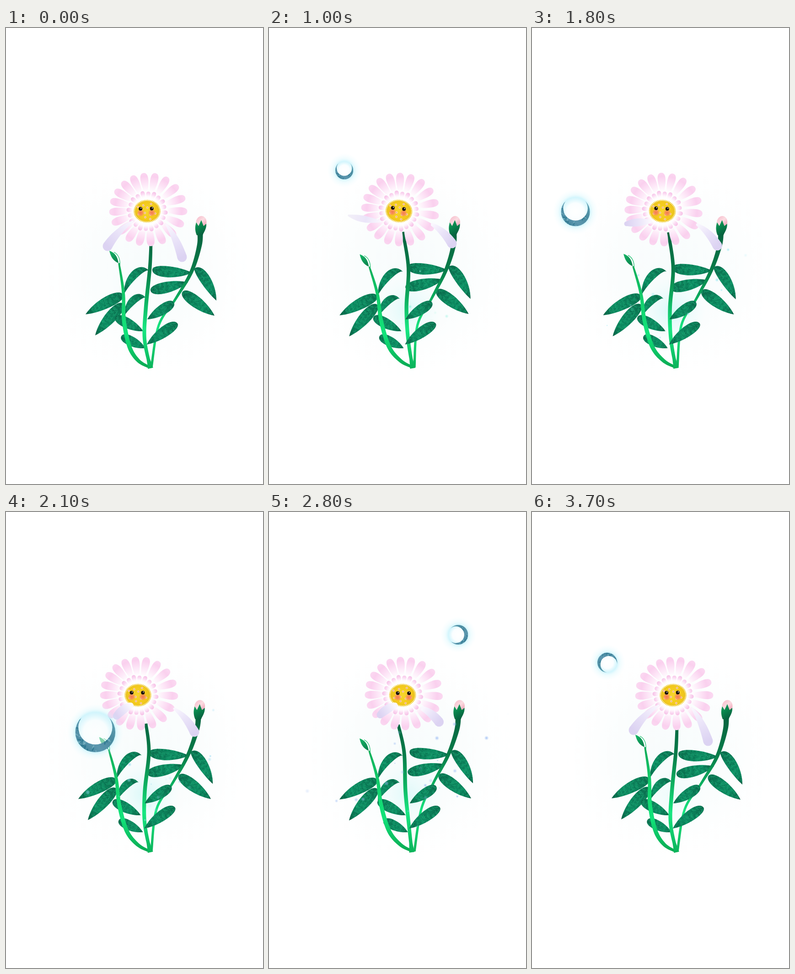
An HTML page with a canvas for the animation above (5400 ms loop, 562 by 997 pixels).

```html
<!DOCTYPE html>
<html lang="en">
<head>
<meta charset="utf-8">
<title>Flower and moon</title>
<style>
html, body { margin: 0; width: 100%; height: 100%; overflow: hidden; background: #fff; }
canvas { display: block; width: 562px; height: 997px; }
</style>
</head>
<body>
<canvas id="stage" width="562" height="997"></canvas>
<script>
const ctx = document.getElementById('stage').getContext('2d');
const W = 562, H = 997, LOOP = 5400, STEP = 100, LAST = 37;
const TAU = Math.PI * 2, RAD = Math.PI / 180;
const lerp = (a, b, t) => a + (b - a) * t;
const clamp = (x, lo = 0, hi = 1) => Math.max(lo, Math.min(hi, x));
const ease = t => t * t * (3 - 2 * t);
const ramp = (f, from, to) => ease(clamp((f - from) / (to - from)));
const seeded = s => () => (s = (s * 16807) % 2147483647) / 2147483647;

// Key poses: head and neck x, sideways lean of the leaf groups, face, hands relative to the head
const rest = { at: 0, head: 311, neck: 317, left: 0, right: 0, low: 0, tilt: -1, gaze: -2, lx: -89, ly: 80, rx: 74, ry: 104 };
const poses = [
  rest,
  { at: 5, head: 289.5, neck: 295, left: -18.5, right: -17, low: -10, tilt: 7, gaze: -1.5, lx: -112, ly: 13, rx: 112, ry: 74 },
  { at: 15, head: 284.5, neck: 290, left: -21, right: -20, low: -11, tilt: 5, gaze: -2, lx: -113, ly: 13, rx: 114, ry: 74 },
  { at: 21, head: 291, neck: 306, left: -16, right: -7.5, low: -5.5, tilt: 0, gaze: -1.5, lx: -49, ly: 49, rx: 121, ry: 84 },
  { at: 25, head: 288, neck: 269, left: -25, right: -18.5, low: -1, tilt: -1, gaze: 5.5, lx: -51, ly: 51, rx: 106, ry: 85 },
  { at: 31, head: 301.5, neck: 296, left: -15, right: -8, low: -1.5, tilt: 2, gaze: -2.5, lx: -52, ly: 42, rx: 48, ry: 39 },
  { ...rest, at: LAST }
];

function poseAt(f) {
  const i = Math.max(1, poses.findIndex(p => p.at >= f));
  const a = poses[i - 1], b = poses[i], t = ramp(f, a.at, b.at), out = {};
  for (const k in a) out[k] = lerp(a[k], b[k], t);
  return out;
}

function gradient(g, stops) {
  stops.forEach(([p, c]) => g.addColorStop(p, c));
  return g;
}
const linear = (x0, y0, x1, y1, ...stops) => gradient(ctx.createLinearGradient(x0, y0, x1, y1), stops);
const radial = (x, y, r, ...stops) => gradient(ctx.createRadialGradient(x, y, 0, x, y, r), stops);

function oval(x, y, rx, ry, fill, turn = 0) {
  ctx.beginPath();
  ctx.ellipse(x, y, rx, ry, turn, 0, TAU);
  ctx.fillStyle = fill;
  ctx.fill();
}
const disc = (x, y, r, fill) => oval(x, y, r, r, fill);
const glow = (x, y, r, ...stops) => disc(x, y, r, radial(x, y, r, ...stops));

function moved(dx, dy, paint) {
  ctx.save();
  ctx.translate(dx, dy);
  paint();
  ctx.restore();
}

// Smooth samples through a few points
function spline(pts, n = 10) {
  const out = [];
  for (let i = 0; i < pts.length - 1; i++) {
    const a = pts[i], b = pts[i + 1], p = pts[i - 1] || a, q = pts[i + 2] || b;
    for (let s = 0; s < n; s++) {
      const t = s / n;
      out.push([0, 1].map(k => a[k] + t * ((b[k] - p[k]) / 2 +
        t * (p[k] - 2.5 * a[k] + 2 * b[k] - q[k] / 2 +
        t * (1.5 * (a[k] - b[k]) + (q[k] - p[k]) / 2)))));
    }
  }
  return out.concat([pts[pts.length - 1]]);
}

// Band of varying half width along samples
function ribbon(pts, half, fill) {
  const end = pts.length - 1, left = [], right = [];
  pts.forEach(([x, y], i) => {
    const a = pts[Math.max(0, i - 1)], b = pts[Math.min(end, i + 1)];
    const ang = Math.atan2(b[1] - a[1], b[0] - a[0]), w = half(i / end);
    const dx = -Math.sin(ang) * w, dy = Math.cos(ang) * w;
    left.push([x + dx, y + dy]);
    right.unshift([x - dx, y - dy]);
  });
  ctx.beginPath();
  left.concat(right).forEach(p => ctx.lineTo(p[0], p[1]));
  ctx.closePath();
  ctx.fillStyle = fill;
  ctx.fill();
}

// Leaf from its blunt end to its point, optionally bent sideways
function leaf(bx, by, tx, ty, bend = 0) {
  const len = Math.hypot(tx - bx, ty - by), wide = 9 + len * .09 - Math.abs(bend) * .2;
  const h1 = bend + wide, h2 = bend - wide, rnd = seeded(Math.round(bx * 31 + ty * 7));
  moved(bx, by, () => {
    ctx.rotate(Math.atan2(ty - by, tx - bx));
    ctx.beginPath();
    ctx.moveTo(0, 0);
    ctx.bezierCurveTo(0, h1, len * .62, h1, len, 0);
    ctx.bezierCurveTo(len * .62, h2, 0, h2, 0, 0);
    ctx.fillStyle = linear(0, 0, len, 0, [0, '#0a6a4b'], [.3, '#0c7f59'], [.65, '#0d8c62'], [1, '#086044']);
    ctx.fill();
    ctx.clip();
    for (let x = 3; x < len; x += 9) {
      for (let y = Math.min(h2, 0); y < Math.max(h1, 0); y += 8) {
        const cx = x + rnd() * 5, cy = y + rnd() * 5, turn = rnd() * 3;
        for (let k = 0; k < 3; k++) {
          const a = turn + k * 1.1;
          oval(cx + Math.cos(a) * 3, cy + Math.sin(a) * 3, 2.7, 1.2, 'rgba(30,172,120,.4)', a);
        }
        oval(cx + 4, cy + 3, 2.5, .8, 'rgba(3,66,51,.3)', turn);
      }
    }
  });
}

function plant(p) {
  const { left, right, low, neck } = p, lean = neck - 317;
  const budX = -.06 * right * right, sproutX = left * 1.4, sproutY = left * left * .02;
  const drop = left * left * .006;
  moved(left, drop, () => {
    leaf(257, 584, 174, 626, 3);
    leaf(257, 603, 195, 672, 2);
    leaf(313, 531, 258, 582, 21);
    leaf(306, 590, 258, 630, 18);
  });
  moved(low, 0, () => {
    leaf(239, 632, 300, 663);
    leaf(252, 674, 305, 700);
  });
  moved(right * .95, right * .33, () => {
    leaf(320, 528, 407, 535, 3);
    leaf(316, 574, 398, 556, 1);
  });
  moved(right * 1.05, right * .2, () => {
    leaf(413, 525, 460, 596, -7);
    leaf(386, 577, 456, 629);
  });

  const light = linear(0, 500, 0, 742, [0, '#0aa253'], [.4, '#14d16d'], [.7, '#12e37a'], [1, '#09a952']);
  const deep = linear(0, 440, 0, 742, [0, '#08623f'], [.3, '#087c49'], [.5, '#0cad5e'], [.72, '#18e781'], [1, '#0bb45b']);
  ribbon(spline([[424 + budX, 440], [423 + (budX + right) / 2, 475], [405 + right, 534 + right * .2],
    [371 + right * .85, 592], [334 + low * .9, 650], [318, 742]]),
    t => lerp(6.5, 2.6, Math.min(1, t * 1.6)), deep);
  ribbon(spline([[247 + sproutX, 514 + sproutY], [256.5 + left, 578 + drop], [258 + left * .65, 640],
    [270 + left * .38, 697], [289 + left * .1, 727], [312, 741]]),
    t => 1 + 3.6 * Math.sin(Math.PI * Math.min(.88, t * .8 + .06)), light);
  const sag = lean * lean;
  ribbon(spline([[neck, 440 + 32 * Math.abs(Math.cos(lean / 14))], [314.5 - sag * .016, 525],
    [306 + lean * .22, 610], [303 + sag * .002, 680], [316 - sag * .003, 744]]),
    t => 3.3 + .9 * Math.sin(t * 3) + Math.max(0, t - .9) * 25, deep);
  moved(low, 0, () => {
    leaf(367, 600, 309, 637);
    leaf(375, 646, 308, 692, 2);
  });
  moved(sproutX, sproutY, sprout);
  moved(budX, 1, bud);
}

function sprout() {
  ctx.beginPath();
  ctx.moveTo(226, 487);
  ctx.bezierCurveTo(238, 491, 244, 500, 246, 514);
  ctx.bezierCurveTo(234, 509, 229, 500, 226, 487);
  ctx.fillStyle = linear(226, 487, 246, 514, [0, '#16b767'], [1, '#087d4a']);
  ctx.fill();
  ctx.beginPath();
  ctx.moveTo(236, 490);
  ctx.bezierCurveTo(246, 495, 250, 506, 249, 518);
  ctx.strokeStyle = '#12bc67';
  ctx.lineWidth = 1.2;
  ctx.stroke();
}

function bud() {
  oval(427, 424, 11.5, 14, linear(417, 412, 439, 434, [0, '#f7bdcc'], [.45, '#fbdde2'], [1, '#f095ae']), .15);
  ctx.beginPath();
  ctx.moveTo(417, 452);
  ctx.bezierCurveTo(413, 442, 413, 433, 416, 424);
  ctx.lineTo(421, 432);
  ctx.lineTo(427, 419);
  ctx.lineTo(432, 432);
  ctx.lineTo(438, 427);
  ctx.bezierCurveTo(439, 437, 433, 445, 430, 452);
  ctx.closePath();
  ctx.fillStyle = linear(415, 421, 433, 448, [0, '#13a35f'], [.5, '#08824b'], [1, '#07613f']);
  ctx.fill();
}

function petal(deg, r0, r1, w, fill) {
  const len = r1 - r0;
  ctx.save();
  ctx.rotate(deg * RAD);
  ctx.beginPath();
  ctx.moveTo(0, -r0);
  ctx.bezierCurveTo(-w * .7, -r0 - len * .4, -w * 1.5, -r1, 0, -r1);
  ctx.bezierCurveTo(w * 1.5, -r1, w * .7, -r0 - len * .4, 0, -r0);
  ctx.fillStyle = fill;
  ctx.fill();
  ctx.restore();
}

function flower(p) {
  ctx.save();
  ctx.translate(p.head, 397);
  ctx.rotate(p.tilt * RAD);
  const outer = radial(0, 0, 86, [0, '#fff'], [.45, '#fff'], [.66, '#fde6f7'], [.85, '#fad0ee'], [1, '#fbdaf2']);
  const count = 19;
  for (let i = 0; i < count; i++) {
    const base = i * 360 / count - 3, a = base + 3 + 6.5 * Math.cos((base - 190) * RAD);
    petal(a, 26, 80 + 5.5 * Math.abs(Math.sin(a * RAD)), 10.2, outer);
  }
  ctx.translate(-2.5, 3.5);
  glow(0, 0, 48, [0, '#fff'], [.7, 'rgba(255,255,255,.85)'], [1, 'rgba(255,255,255,0)']);
  const inner = radial(0, 0, 45, [0, '#fff'], [.64, '#fff'], [.82, '#fce1f5'], [1, '#f6bfe6']);
  for (let i = 0; i < 20; i++) petal(i * 18 + 5, 20, 43 + i % 2 * 2, 5.6, inner);
  glow(0, 0, 38, [0, '#fff'], [.75, 'rgba(255,255,255,.9)'], [1, 'rgba(255,255,255,0)']);
  face(p.gaze);
  ctx.restore();
}

function face(gaze) {
  ctx.strokeStyle = '#efc825';
  ctx.lineWidth = 1.7;
  ctx.beginPath();
  for (let i = 0; i < 54; i++) {
    const c = Math.cos(i * TAU / 54), s = Math.sin(i * TAU / 54);
    ctx.moveTo(c * 24, s * 21);
    ctx.lineTo(c * 29.5, s * 25);
  }
  ctx.stroke();
  oval(0, 0, 26.5, 22.5, radial(0, 0, 27, [0, '#f7d52c'], [.7, '#f3c91d'], [1, '#eac11d']));
  // little blossoms on a spiral
  for (let i = 1; i < 13; i++) {
    const d = Math.sqrt(i / 13), x = 24 * d * Math.cos(i * 2.4), y = 20 * d * Math.sin(i * 2.4);
    for (let k = 0; k < 5; k++) {
      disc(x + Math.cos(k * TAU / 5) * 1.5, y + Math.sin(k * TAU / 5) * 1.5, 1, '#fde9cf');
    }
    disc(x, y, 1, '#e4607c');
  }
  const ey = -5.5 + Math.max(0, gaze) * .7;
  for (const side of [-1, 1]) {
    const x = gaze + side * 12.3;
    glow(x, ey + 9, 8.5, [0, 'rgba(247,112,91,.9)'], [.55, 'rgba(248,132,96,.75)'], [1, 'rgba(248,150,90,0)']);
    disc(x, ey, 4, '#160d09');
    disc(x + 1.2, ey - 1.4, 1.1, '#fff');
  }
}

// Long arms hang from a thin shoulder, short ones are plump, raised ones end in a point
function arm(head, sx, sy, hx, hy) {
  const len = Math.hypot(hx - sx, hy - sy);
  const tip = Math.min(10.5, hy / 6), root = clamp(12 - len / 7, 2, 8), bulge = 1 + (10.5 - tip) * .5;
  const cx = lerp(sx, hx, .6), cy = lerp(sy, hy, .35), pts = [];
  for (let i = 0; i <= 24; i++) {
    const t = i / 24;
    pts.push([lerp(lerp(sx, cx, t), lerp(cx, hx, t), t), lerp(lerp(sy, cy, t), lerp(cy, hy, t), t)]);
  }
  moved(head, 397, () => {
    const fill = linear(sx, sy, hx, hy, [0, '#faf7fe'], [.45, '#ebe5f9'], [1, tip < 4 ? '#f2eff8' : '#dcd3f2']);
    disc(sx, sy, root, fill);
    disc(hx, hy, tip, fill);
    ribbon(pts, t => lerp(root, tip, t) + bulge * Math.sin(Math.PI * t), fill);
  });
}

function drop(f) {
  ctx.globalAlpha = clamp(f / 3) * clamp((10 - f) / 2);
  moved(166, lerp(298, 310, ramp(f, 1, 5)), () => {
    glow(0, 4, 26, [0, 'rgba(125,218,255,.7)'], [.4, 'rgba(150,228,255,.35)'], [1, 'rgba(190,240,255,0)']);
    ctx.beginPath();
    ctx.moveTo(0, -19);
    ctx.bezierCurveTo(2, -9, 11, -2, 11, 7);
    ctx.bezierCurveTo(11, 21, -11, 21, -11, 7);
    ctx.bezierCurveTo(-11, -2, -2, -9, 0, -19);
    ctx.fillStyle = linear(0, -19, 0, 18, [0, '#54a9c9'], [.25, '#159bed'], [.65, '#1196f2'], [1, '#2b7fb7']);
    ctx.fill();
    oval(-6, 6, 2, 3.6, '#eefaff', .1);
  });
  ctx.globalAlpha = 1;
}

// One tilted orbit around the flower: near and large below, far and small above
function moon(f) {
  const phi = (230 - 360 * Math.pow(clamp((f - 15) / 16), 1.2)) * RAD;
  const side = Math.cos(phi), depth = Math.sin(phi);
  const r = (32 + 13.5 * depth) * lerp(.65, 1, ramp(f, 8, 11));
  const open = -90 - 90 * ramp(f, 21, 25) - 130 * ramp(f, 31, LAST);
  const R = r + 18, rnd = seeded(77);
  ctx.save();
  ctx.globalAlpha = clamp((f - 7) / 3);
  ctx.translate(290 + 195 * side, 372 + 107 * depth - 33 * side + 18 * ramp(f, 31, LAST));
  glow(0, 0, R, [0, 'rgba(255,255,255,.4)'], [r * .6 / R, 'rgba(245,253,255,.5)'],
    [r / R, 'rgba(150,232,250,.42)'], [(r + 6) / R, 'rgba(190,243,252,.24)'], [1, 'rgba(220,249,255,0)']);
  ctx.rotate(open * RAD);
  ctx.beginPath();
  ctx.arc(0, 0, r, 0, TAU);
  ctx.clip();
  ctx.beginPath();
  ctx.rect(-2 * r, -2 * r, 4 * r, 4 * r);
  ctx.arc(r * .24, 0, r * .85, 0, TAU);
  ctx.clip('evenodd');
  ctx.fillStyle = linear(-r, -r, r, r, [0, '#397e96'], [.35, '#5b96ae'], [.6, '#4b8ba0'], [1, '#66a8ba']);
  ctx.fillRect(-r, -r, 2 * r, 2 * r);
  for (let i = 0; i < 40; i++) {
    const a = rnd() * TAU, d = r * (.7 + rnd() * .3);
    oval(Math.cos(a) * d, Math.sin(a) * d, r * .1, r * .035,
      i % 2 ? 'rgba(20,105,128,.55)' : 'rgba(150,205,215,.4)', rnd() * 3);
  }
  ctx.restore();
}

// Sparks drift outwards from the lower stem
function sparks(f) {
  const rnd = seeded(4021);
  for (let i = 0; i < 34; i++) {
    const age = f - 2 - rnd() * 24, t = age / (8 + rnd() * 9), ang = -Math.PI * (1.2 * rnd() - .1);
    const x0 = 230 + rnd() * 150, y0 = 560 + rnd() * 140, speed = 7 + rnd() * 13, r = 2 + rnd() * 4;
    if (t <= 0 || t >= 1 || f >= LAST) continue;
    const hue = lerp(168, 218, clamp((f - 12) / 16));
    ctx.globalAlpha = Math.sin(Math.PI * t) * .65;
    glow(x0 + Math.cos(ang) * speed * age, y0 + Math.sin(ang) * speed * age, r,
      [0, `hsl(${hue},75%,70%)`], [.35, `hsla(${hue},80%,76%,.8)`], [1, `hsla(${hue},80%,85%,0)`]);
  }
  ctx.globalAlpha = 1;
}

function draw(f) {
  const p = poseAt(f);
  ctx.fillStyle = '#fff';
  ctx.fillRect(0, 0, W, H);
  glow(305, 530, 260, [0, 'rgba(236,247,248,.4)'], [.5, 'rgba(243,250,250,.35)'], [1, 'rgba(255,255,255,0)']);
  const shine = f ? .2 + .35 * Math.sin(Math.PI * f / LAST) : 0;
  glow(305, 618, 75, [0, `rgba(190,244,244,${shine})`], [1, 'rgba(220,250,250,0)']);
  plant(p);
  const far = f > 26;
  if (far) moon(f);
  flower(p);
  arm(p.head, p.lx * .38, 26, p.lx, p.ly);
  arm(p.head, p.rx * .8 - 20, 33 - ramp(-p.rx, -74, -48) * 11, p.rx, p.ry);
  drop(f);
  if (!far && f > 7) moon(f);
  sparks(f);
}

const start = performance.now();
let shown = -1;
function tick(now) {
  const ms = Math.max(0, now - start) % LOOP;
  const f = Math.min(LAST, Math.floor(ms / STEP));
  if (f !== shown) draw(shown = f);
  requestAnimationFrame(tick);
}
draw(0);
requestAnimationFrame(tick);
</script>
</body>
</html>
```
